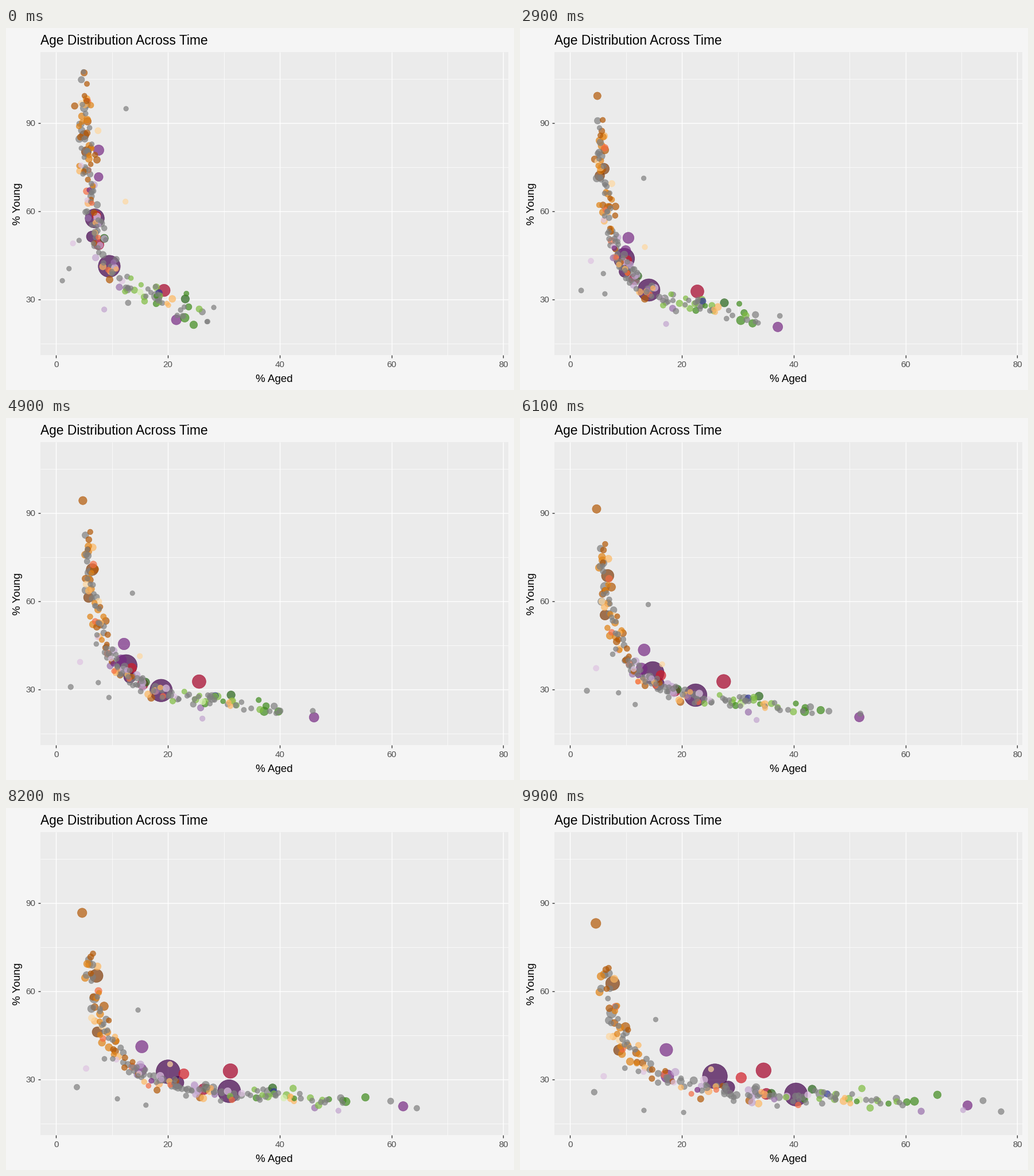
A matplotlib script for the animation above (10 s loop, 885x632 px).

```python
import numpy as np
import matplotlib.pyplot as plt
from matplotlib.animation import FuncAnimation
from matplotlib.colors import to_rgba
from matplotlib.patches import Rectangle

W, H, DPI = 885, 632, 64
PT = 72 / DPI                                  # points per pixel
FRAMES = 100
LEFT, RIGHT, TOP, BOTTOM = 60, 875, 42, 571

BROWN, RUST, ORANGE, SAND, CREAM = "#7f3b08", "#b35806", "#e08214", "#fdb863", "#fed8a0"
INK, PURPLE, LILAC, MAUVE, PALE = "#40004b", "#762a83", "#9970ab", "#c2a5cf", "#dfc4e2"
WINE, RED, CORAL, PEACH = "#a50026", "#d01c27", "#f46d43", "#fdae61"
FOREST, GREEN, LEAF, LIME, MINT = "#276419", "#3f8a1c", "#7fbc41", "#b8e186", "#d6f0b0"
BLUE, NAVY, GREY = "#4575b4", "#313695", "#7f7f7f"


def px(aged):
    return 87.4 + 9.737 * aged


def py(young):
    return 627.5 - 5.133 * young


def curve(s):
    """Ageing path at stage s, in pixels: the young share falls as the aged share grows."""
    return np.stack([px(3 + np.exp(s)), py(20 + 150 * np.exp(-s))], axis=-1)


GRID = np.linspace(0.4, 4.4, 400)
bubbles = []          # (colour, r0, r1, stage0, stage1, offset0, offset1, pace)


def landmark(color, r0, r1, start, end, pace=1.0):
    """A bubble from start to end (aged, young), carried along the curve."""
    stages, offsets = [], []
    for aged, young in (start, end):
        gap = np.array([px(aged), py(young)]) - curve(GRID)
        i = np.hypot(*gap.T).argmin()
        stages.append(GRID[i])
        offsets.append(gap[i])
    bubbles.append((color, r0, r1, *stages, *offsets, pace))


# largest populations
landmark(INK, 19.5, 20.5, (9.5, 41.2), (40.4, 24.8))
landmark(INK, 17, 22, (6.9, 57.5), (25.9, 31))
landmark(WINE, 11, 13.5, (19.3, 33), (34.6, 33))
landmark(INK, 10, 11.5, (6.4, 51.3), (28.3, 27.2))
landmark(WINE, 9.5, 10, (7.6, 48.6), (35.1, 25))
landmark(BROWN, 9, 12.5, (5.4, 80.2), (7.6, 62.6))
landmark(PURPLE, 9, 8.5, (21.5, 23), (71.1, 21.1), 0.62)
landmark(PURPLE, 9.5, 11.5, (7.6, 80.7), (17.2, 40), 0.6)
landmark(PURPLE, 8, 11.5, (7.6, 71.6), (17.4, 31), 0.7)
landmark(GREY, 9.5, 8.5, (18, 31), (44.8, 25))
landmark(GREY, 7, 9, (5, 95), (7.4, 52.5))
landmark(BROWN, 8.5, 9.5, (5, 85.8), (8.7, 39.9), 1.3)
landmark(RUST, 6, 9, (5, 107), (4.6, 83))
landmark(RUST, 7, 8, (5.6, 90.5), (9.9, 47.8), 1.5)
landmark(ORANGE, 5.5, 7, (6.2, 96), (5.5, 65))
landmark(RED, 8, 9.5, (7.2, 58.5), (30.6, 30.5))
landmark(FOREST, 7.5, 7.5, (8.6, 50.7), (36, 25.2))
landmark(GREEN, 8, 7.5, (23, 23.7), (61.6, 22.5))
landmark(GREEN, 7, 7, (24.6, 21.3), (65.7, 24.7))
landmark(FOREST, 7.5, 7.5, (23.1, 30.1), (43.3, 26.6))
landmark(NAVY, 6, 6, (18.4, 32.2), (46, 25))

# outliers
landmark(GREY, 4.5, 5.5, (1.1, 36.3), (4.3, 25.6))
landmark(GREY, 4.5, 4.5, (2.3, 40.4), (20.3, 18.7))
landmark(GREY, 4.5, 4.5, (4.1, 50), (13.2, 19.4))
landmark(GREY, 4.5, 4.5, (12.5, 94.8), (15.3, 50.3), 0.8)
landmark(GREY, 4.5, 5.5, (28.2, 27.2), (77.1, 19))
landmark(PALE, 5, 5.5, (3, 49), (6, 31))
landmark(MAUVE, 5, 5, (8.6, 26.5), (70.3, 19.5))
landmark(LILAC, 6, 6, (11.3, 34.1), (62.8, 19.1))
landmark(CREAM, 5, 5, (12.4, 63.2), (25.2, 33.4))

# everyone else: rank q decides how far along the curve a bubble starts and ends
CROWD = 158
BANDS = (
    (RUST, RUST, ORANGE, ORANGE, SAND, CREAM, CORAL),
    (PURPLE, LILAC, MAUVE, PEACH, CORAL, SAND, RUST, PALE),
    (LEAF, LEAF, LIME, MINT, GREEN, SAND),
)


def add_crowd(rng):
    ranks = (0, 0.5, 1)
    for q in (np.arange(CROWD) + 0.5) / CROWD:
        s0 = np.interp(q, ranks, (0.62, 1.3, 3.1)) + rng.normal(0, 0.08)
        s1 = np.interp(q, ranks, (1.15, 3.1, 4.1)) + rng.normal(0, 0.1)
        off0 = rng.normal((0, 3), (8, 12))
        off1 = rng.normal(0, 8, 2)
        band = 0 if q < 0.34 else 1 if q < 0.72 else 2
        grey = rng.random() < (0.36, 0.52, 0.54)[band]
        color = GREY if grey else rng.choice(BANDS[band])
        r = 4.4 + 2.2 * rng.random() ** (3 if grey else 1)
        bubbles.append((color, r, r + 0.4, s0, s1, off0, off1, 1.0))


add_crowd(np.random.default_rng(12))
bubbles.sort(key=lambda b: -b[1])
names, r0, r1, s0, s1, off0, off1, pace = map(np.array, zip(*bubbles))
colors = [to_rgba(c, 0.7) for c in names]

plt.rcParams["font.family"] = "Liberation Sans"
fig = plt.figure(figsize=(W / DPI, H / DPI), dpi=DPI, facecolor="#f5f5f5")
ax = fig.add_axes((0, 0, 1, 1))
ax.set(xlim=(0, W), ylim=(H, 0))
ax.axis("off")


def line(xs, ys, width, color="white"):
    ax.plot(xs, ys, color=color, lw=width * PT, zorder=1, solid_capstyle="butt")


def label(x, y, s, size, color="black", **kw):
    ax.text(x, y, s, fontsize=size * PT, color=color, va="baseline", **kw)


ax.add_patch(Rectangle((LEFT, TOP), RIGHT - LEFT, BOTTOM - TOP, fc="#ebebeb", lw=0, zorder=0))
for v in range(0, 81, 10):
    line((px(v), px(v)), (TOP, BOTTOM), 0.7 if v % 20 else 1.4)
for v in range(15, 106, 15):
    line((LEFT, RIGHT), (py(v), py(v)), 0.7 if v % 30 else 1.4)
for v in range(0, 81, 20):
    line((px(v), px(v)), (BOTTOM, BOTTOM + 4.5), 1.4, "#333333")
    label(px(v), 592.5, str(v), 15, "#4d4d4d", ha="center")
for v in (30, 60, 90):
    line((LEFT - 4.5, LEFT), (py(v), py(v)), 1.4, "#333333")
    label(51.5, py(v) + 5.5, str(v), 15, "#4d4d4d", ha="right")

label(60, 28.5, "Age Distribution Across Time", 22.8)
label(467, 618, "% Aged", 18.8, ha="center")
label(25, 307, "% Young", 18.8, ha="center", rotation=90, rotation_mode="anchor")

start = curve(s0) + off0
dots = ax.scatter(*start.T, c=colors, edgecolors=colors, linewidths=0.7 * PT, zorder=3)


def draw(frame):
    t = frame / (FRAMES - 1)
    stage = s0 + (s1 - s0) * t ** pace
    dots.set_offsets(curve(stage) + off0 * (1 - t) + off1 * t)
    r = r0 + (r1 - r0) * t
    dots.set_sizes((2 * (r - 0.3) * PT) ** 2)
    return (dots,)


anim = FuncAnimation(fig, draw, frames=FRAMES, interval=100, repeat=True)
plt.show()
```
